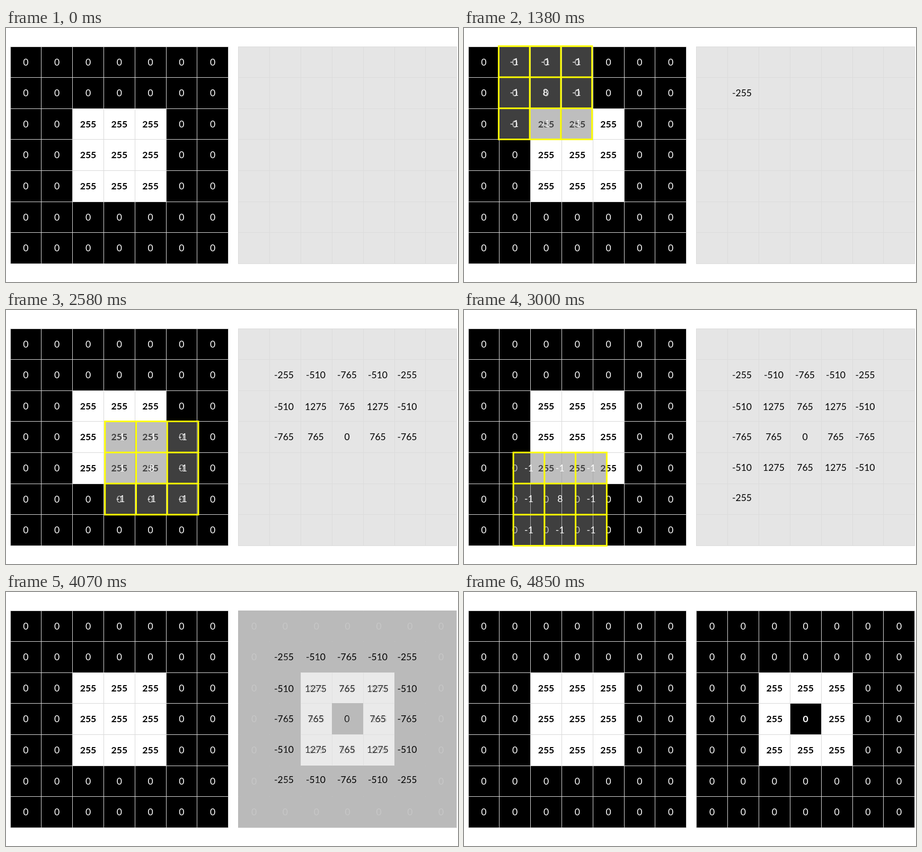
Recreate the animation shown at these times as an HTML page with a canvas. Size 853 by 480 pixels, loop 4.91 s.

```html
<!DOCTYPE html>
<html lang="en">
<head>
<meta charset="utf-8">
<title>Edge detection kernel</title>
<style>
  html, body { margin: 0; width: 100%; height: 100%; overflow: hidden; background: #fff; }
  canvas { display: block; }
</style>
</head>
<body>
<canvas id="stage" width="853" height="480"></canvas>
<script>
const ctx = document.getElementById('stage').getContext('2d');
const LOOP = 4910, STEP = 60, SCAN_END = 3420, REVEAL = 3950;
const N = 7, TOP = 34.8, ROW = 58.55;
const LEFT = { x: 7.6, w: 58.8 }, RIGHT = { x: 438.3, w: 58.85 };
const KERNEL = { x: 7.4, y: 34.2, size: 58.75 };
const OUT_X = [524.5, 584.5, 643.5, 701.5, 757], OUT_Y = [123, 183, 240, 298, 355];

const indices = [...Array(N).keys()];
const inSquare = (r, c) => r > 1 && r < 5 && c > 1 && c < 5;
const isEdge = (r, c) => inSquare(r, c) && !(r === 3 && c === 3);
const clamp = v => Math.max(0, Math.min(1, v));
const mix = (a, b, p) => a + (b - a) * p;

// Filter response at an inner cell: 8 * centre minus its eight neighbours.
function response(r, c) {
  let sum = 9 * inSquare(r, c);
  for (let i = -1; i < 2; i++)
    for (let j = -1; j < 2; j++) sum -= inSquare(r + i, c + j);
  return 255 * sum;
}

function label(text, x, y, color, bold) {
  ctx.font = `${bold ? 'bold ' : ''}17.6px Lato, Carlito, sans-serif`;
  ctx.textAlign = 'center';
  ctx.fillStyle = color;
  ctx.fillText(text, x, y + 6);
}

function grid({ x, w }, fill, line) {
  const px = c => Math.round(x + c * w), py = r => Math.round(TOP + r * ROW);
  for (const r of indices) for (const c of indices) {
    ctx.fillStyle = fill(r, c);
    ctx.fillRect(px(c), py(r), px(c + 1) - px(c), py(r + 1) - py(r));
  }
  ctx.fillStyle = line;
  for (let i = 0; i <= N; i++) {
    ctx.fillRect(px(i), py(0), 1, py(N) - py(0) + 1);
    ctx.fillRect(px(0), py(i), px(N) - px(0) + 1, 1);
  }
}

function image(panel, isWhite) {
  grid(panel, (r, c) => isWhite(r, c) ? '#fff' : '#000', '#d9d9d9');
  for (const r of indices) for (const c of indices) {
    const white = isWhite(r, c);
    label(white ? 255 : 0, panel.x + (c + 0.5) * panel.w + 0.4, TOP + (r + 0.5) * ROW + 0.7,
      white ? '#000' : '#fff', inSquare(r, c));
  }
}

// Scan path as [time, column, row]; a repeated time is a hard cut.
const PATH = [
  [0, 0, 0], [590, 0, 0], [1390, 1, 0], [2038, 4, 0], [2198, 0, 1],
  [2360, 1.3, 1], [2360, 1.3, 2], [2525, 2.6, 2], [2525, 2.6, 3],
  [2695, 4, 3], [2845, 0, 4], [3270, 4, 4], [LOOP, 4, 4]
];

function kernelCell(t) {
  const i = PATH.findIndex(p => p[0] > t);
  const a = PATH[i - 1], b = PATH[i], p = (t - a[0]) / (b[0] - a[0]);
  return [mix(a[1], b[1], p), mix(a[2], b[2], p)];
}

function kernel(t) {
  const { size } = KERNEL, [col, row] = kernelCell(t);
  ctx.save();
  ctx.globalAlpha = clamp(t / 480) * clamp((SCAN_END - t) / 150);
  ctx.translate(KERNEL.x + col * size, KERNEL.y + row * size);
  ctx.fillStyle = 'rgba(127,127,127,.5)';
  ctx.fillRect(0, 0, size * 3, size * 3);
  for (let r = 0; r < 3; r++)
    for (let c = 0; c < 3; c++)
      label(r === 1 && c === 1 ? 8 : -1, (c + 0.5) * size, (r + 0.5) * size, '#fff');
  ctx.strokeStyle = '#ff0';
  ctx.lineWidth = 3;
  ctx.beginPath();
  for (let i = 0; i < 4; i++) {
    ctx.moveTo(i * size, -1.5);
    ctx.lineTo(i * size, size * 3 + 1.5);
    ctx.moveTo(-1.5, i * size);
    ctx.lineTo(size * 3 + 1.5, i * size);
  }
  ctx.stroke();
  ctx.restore();
}

const shownAt = k => k === 0 ? 510 : k === 1 ? 1440 : 1592 + 78 * (k - 2);

function responses(t) {
  OUT_Y.forEach((y, r) => OUT_X.forEach((x, c) => {
    if (t >= shownAt(r * 5 + c)) label(response(r + 1, c + 1), x, y, '#000');
  }));
}

// The picture advances in 60 ms steps and rests between scan and reveal.
function stepped(t) {
  if (t >= REVEAL) return REVEAL + Math.floor((t - REVEAL) / STEP) * STEP;
  return Math.min(SCAN_END, Math.floor(t / STEP) * STEP);
}

function draw(now) {
  const t = stepped(now % LOOP);
  ctx.fillStyle = '#fff';
  ctx.fillRect(0, 0, 853, 480);
  image(LEFT, inSquare);
  grid(RIGHT, () => '#e5e5e5', '#dcdcdc');
  responses(t);
  if (t < SCAN_END) kernel(t);
  if (t >= REVEAL) {
    ctx.globalAlpha = clamp((t - REVEAL + STEP) / 960);
    image(RIGHT, isEdge);
    ctx.globalAlpha = 1;
  }
}

const start = performance.now();
function tick() {
  draw(performance.now() - start);
  requestAnimationFrame(tick);
}
tick();
</script>
</body>
</html>
```
